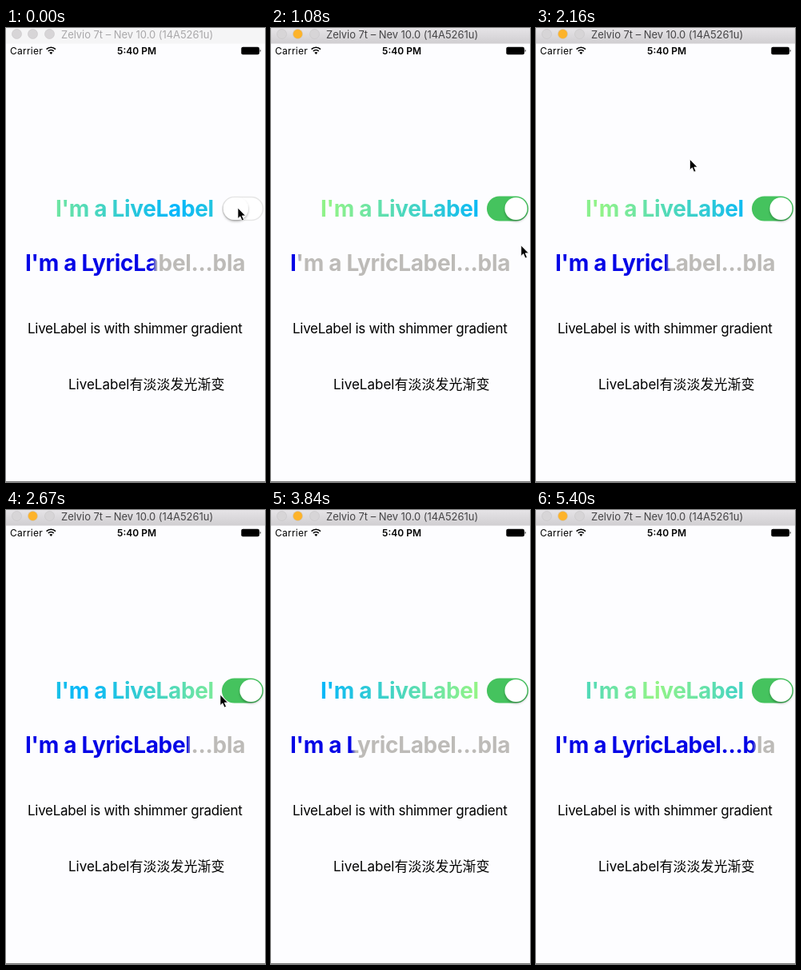
Write an HTML page that moves like this. It is 324 px wide and 568 px high and loops after 5430 ms.

```html
<!DOCTYPE html>
<html lang="en">
<head>
<meta charset="utf-8">
<style>
html, body { margin: 0; width: 100%; height: 100%; overflow: hidden; background: #fdfdff; }
svg { display: block; width: 324px; height: 568px; font-family: Inter, "Noto Sans CJK SC", "Noto Sans CJK", sans-serif; }
.big { font-size: 28px; font-weight: 700; letter-spacing: -.33px; }
.body { font-size: 17px; letter-spacing: -.28px; }
.status { font-size: 12px; }
</style>
</head>
<body>
<svg viewBox="0 0 324 568">
  <defs>
    <linearGradient id="bar" x2="0" y2="1">
      <stop stop-color="#e6e4e7"/><stop offset="1" stop-color="#d0ced1"/>
    </linearGradient>
    <linearGradient id="shimmer" gradientUnits="userSpaceOnUse" spreadMethod="repeat" y1="0" y2="0">
      <stop stop-color="#94f486"/><stop offset=".25" stop-color="#48d6c0"/>
      <stop offset=".5" stop-color="#04b6fc"/><stop offset=".75" stop-color="#48d6c0"/>
      <stop offset="1" stop-color="#94f486"/>
    </linearGradient>
    <linearGradient id="lyric" gradientUnits="userSpaceOnUse" y1="0" y2="0">
      <stop stop-color="#0505e6"/><stop offset="1" stop-color="#bdbbb8"/>
    </linearGradient>
    <filter id="soft" x="-30%" y="-30%" width="160%" height="170%">
      <feDropShadow dx="0" dy="2" stdDeviation="1.5" flood-opacity=".3"/>
    </filter>
  </defs>

  <rect width="324" height="568" fill="#fdfdff"/>
  <rect width="324" height="19.5" fill="#f5f5f6"/>
  <rect id="activeBar" width="324" height="19.5" fill="url(#bar)"/>
  <g stroke="#c6c4c6" stroke-width=".6" fill="#d7d5d7">
    <circle cx="13.5" cy="7.5" r="6"/>
    <circle id="amber" cx="33.5" cy="7.5" r="6"/>
    <circle cx="54.5" cy="7.5" r="6"/>
  </g>
  <text id="title" x="69" y="12.5" font-size="13" letter-spacing="-.05">Zelvio 7t – Nev 10.0 (14A5261u)</text>

  <text class="status" x="5" y="32.5" letter-spacing=".25">Carrier</text>
  <g fill="none" stroke="#000" stroke-width="1.6">
    <path d="M50.6 26.6a8 8 0 0 1 11.4 0M52.8 29a5 5 0 0 1 7 0"/>
    <path d="M56.3 33l-2-2.2a3 3 0 0 1 4 0z" fill="#000" stroke="none"/>
  </g>
  <text class="status" x="163.5" y="32.5" font-weight="600" text-anchor="middle">5:40 PM</text>
  <rect x="294.3" y="23.8" width="22.6" height="9.4" rx="2"/>
  <path d="M317.7 26.8q2 1.7 0 3.4z"/>

  <text class="big" x="62" y="236" fill="url(#shimmer)">I'm a LiveLabel</text>
  <text class="big" x="24" y="304" fill="url(#lyric)">I'm a LyricLabel...bla</text>
  <text class="body" x="27" y="382">LiveLabel is with shimmer gradient</text>
  <text class="body" x="78" y="452" style="letter-spacing: 0">LiveLabel有淡淡发光渐变</text>

  <rect x="271" y="211.5" width="50.5" height="29" rx="14.5" fill="#fff" stroke="#e6e6e6" stroke-width="1.5"/>
  <rect id="track" x="270" y="210.5" width="52" height="31" rx="15.5" fill="#45c35e"/>
  <rect id="knob" y="212" height="28" rx="14" fill="#fff" filter="url(#soft)"/>

  <path id="cursor" d="M0 0V13.5L3 10.7L5.2 16L7.6 15L5.4 9.9H9.6Z" stroke="#fff" stroke-width=".8"/>
  <rect y="567" width="324" height="1" fill="#777"/>
</svg>
<script>
const LOOP = 5430;
const el = id => document.getElementById(id);
const set = (id, attrs) => {
  for (const key in attrs) el(id).setAttribute(key, attrs[key]);
};

// Keys are [time, value, ...]; values are interpolated linearly.
function at(keys, t, n = 1) {
  let i = 0;
  while (i < keys.length - 2 && t > keys[i + 1][0]) i++;
  const a = keys[i], b = keys[i + 1];
  const k = Math.min(1, Math.max(0, (t - a[0]) / (b[0] - a[0])));
  return a[n] + (b[n] - a[n]) * k;
}

// Travel is continuous; the lyric wraps every 274 px, the shimmer every 396 px.
const sung = [[0, 186], [600, 250], [1560, 364], [2670, 503], [3840, 651], [4680, 734], [5400, 822]];
const shine = [[0, 15], [600, -146], [1560, -502], [2670, -893], [3840, -1326], [4680, -1569], [5400, -1830]];
const pointer = [[0, 290, 225], [300, 290, 225], [600, 307, 281], [900, 314, 290], [1200, 312, 260],
  [1560, 171, 134], [1900, 150, 125], [2300, 215, 185], [2670, 268, 231], [2800, 262, 245], [3150, -12, 330]];

function draw(t) {
  const x = at(shine, t);
  set("shimmer", { x1: x, x2: x + 396 });

  const edge = 25 + (at(sung, t) - 25) % 274;
  set("lyric", { x1: edge - 3, x2: edge + 3 });

  const active = t >= 60;
  set("activeBar", { opacity: +active });
  set("amber", { fill: active ? "#fdb32a" : "#d7d5d7" });
  set("title", { fill: active ? "#454446" : "#a9a8aa" });

  const k = at([[120, 0], [360, 1]], t), on = k * k * (3 - 2 * k);
  set("track", { opacity: on });
  set("knob", { x: 272 + 20.5 * on, width: 31 - 3 * on });

  set("cursor", { transform: `translate(${at(pointer, t)} ${at(pointer, t, 2)})` });
}

const start = performance.now();
function tick() {
  draw((performance.now() - start) % LOOP);
  requestAnimationFrame(tick);
}
tick();
</script>
</body>
</html>
```
